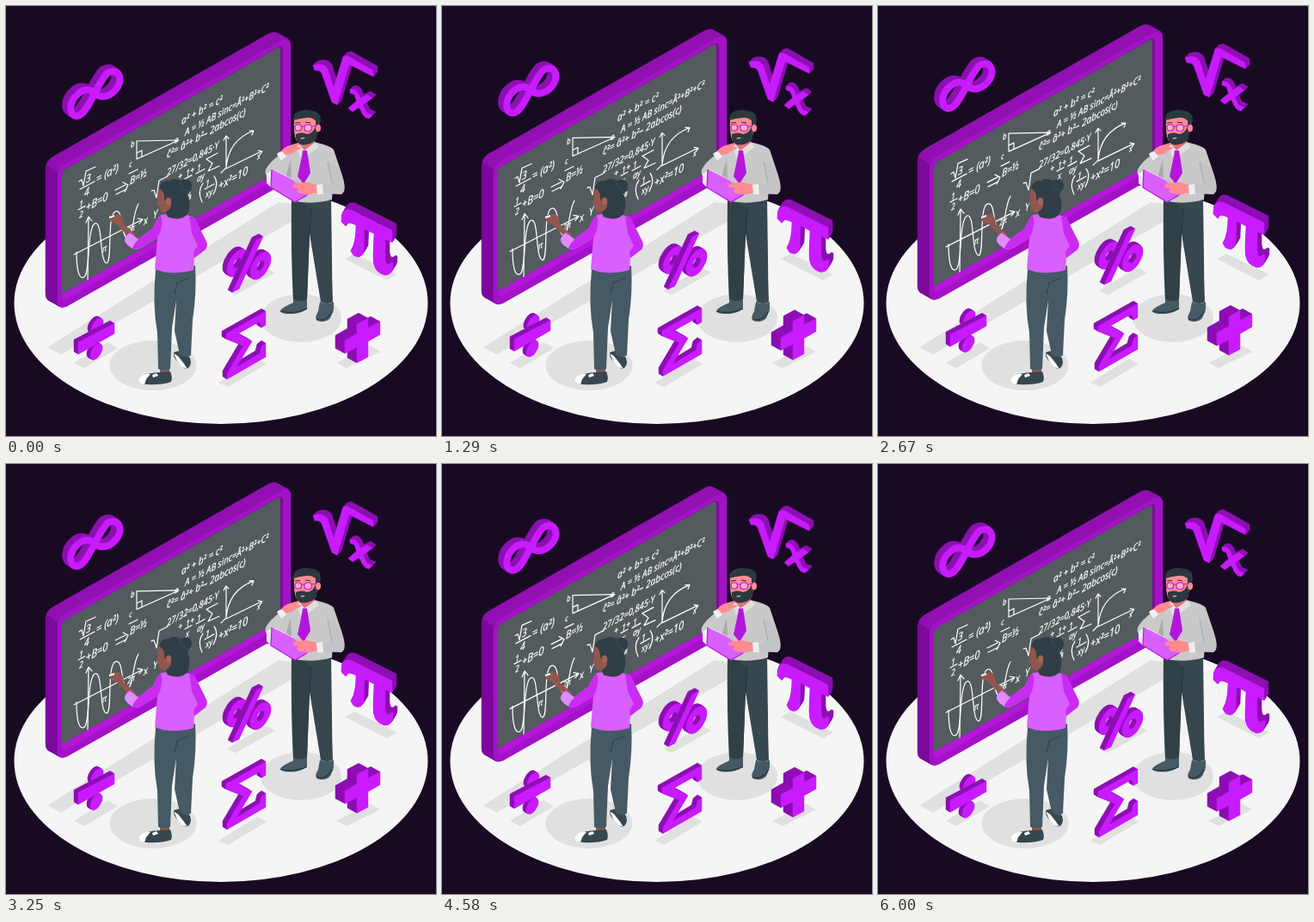
Recreate the animation shown at these times as an HTML page. Size 500x500 px, loop 6040 ms.

```html
<!DOCTYPE html>
<html lang="en">
<head>
<meta charset="utf-8">
<title>Maths class</title>
<style>
html, body { margin: 0; width: 100%; height: 100%; overflow: hidden; background: #190a24; }
svg { display: block; width: 100vw; height: 100vh; }
.shadow { fill: #e0e0e0; }
.chalk { fill: none; stroke: #fff; stroke-width: 1.2; stroke-linecap: round; stroke-linejoin: round; }
.chalk text { fill: #fff; stroke-width: .3; font-family: "Open Sans", "Noto Sans", sans-serif; font-style: italic; }
.dark { fill: #8d10b3; stroke: #8d10b3; }
.front { fill: #c91bff; stroke: #c91bff; }
.dark, .front { stroke-width: .4; stroke-linejoin: round; }
.band .dark, .band .front { fill: none; stroke-width: 8; }
.rim .dark { fill: #7e0c9e; stroke: #7e0c9e; }
.rim .front { fill: #a312c6; stroke: #a915cd; }
</style>
</head>
<body>
<svg viewBox="0 0 500 500">
  <rect width="500" height="500" fill="#190a24"/>
  <ellipse cx="250" cy="345.5" rx="240.5" ry="140.5" fill="#f5f5f5"/>
  <g class="shadow">
    <path d="M48 397L64 405L340 246V231L317 228Z"/>
    <ellipse cx="171" cy="418" rx="50.5" ry="29"/>
    <ellipse cx="343" cy="363" rx="47" ry="28"/>
    <path d="M79 415L91 421L130 398L118 391Z"/>
    <path d="M257 331L267 336L313 310L302 304Z"/>
    <path d="M247 438L258 443L303 416L292 410Z"/>
    <path d="M384 415L396 421L435 402L424 395Z"/>
    <path d="M394 294L405 288L455 312L443 319Z"/>
  </g>

  <g class="float" id="board"></g>
  <g class="float chalk" id="writing"></g>
  <g class="float" id="symbols"></g>

  <g id="student">
    <path d="M195 403Q202 399 206 404L214 409Q217 419 210 422Q206 422 201 415Q194 409 195 403Z" fill="#37474f"/>
    <path d="M195 404L199 413L205 420L211 422L207 416L200 407Z" fill="#fff"/>
    <path d="M203 398H212L213 408L207 407Z" fill="#91564d"/>
    <path d="M179 418H190V429L179 428Z" fill="#91564d"/>
    <path d="M155 432Q166 426 179 426L191 425Q194 432 192 437Q180 441 164 440Q154 440 155 432Z" fill="#37474f"/>
    <path d="M155 432Q162 427 168 428L163 434L161 440Q153 439 155 432ZM170 429L175 427L177 430L171 432Z" fill="#fff"/>
    <path d="M174 306Q170 348 176 380L177 422Q184 425 191 422L193 374L198 342L196 378L202 405Q209 411 215 406L217 365Q222 333 220 302Z" fill="#455a64"/>
    <path d="M196 335L199 322L213 316" fill="none" stroke="#2f3e45" stroke-width="1"/>
    <path d="M145 269Q135 262 129 254L121 250Q119 245 123 243L132 242Q137 246 137 254L151 266Z" fill="#91564d"/>
    <path d="M120 246L126 244" stroke="#fff" stroke-width="2"/>
    <path d="M180 243Q174 249 171 258L154 271L144 263Q137 268 138 274L147 282Q153 285 161 279L176 270L173 306Q192 314 218 307L219 293L232 283Q236 278 231 270L219 246Q204 239 180 243Z" fill="#d95fff"/>
    <path d="M180 243Q174 249 171 258L154 271L146 281Q153 285 161 279L176 270Q184 256 180 243ZM213 244L219 246L231 270Q236 278 232 283L219 293L218 286L223 279L216 264Z" fill="#c92bf2"/>
    <path d="M138 271Q141 263 147 266L154 272Q149 275 147 282Q138 277 138 271Z" fill="#e08cff"/>
    <path d="M180 209Q175 216 177 224L175 230L178 233Q178 241 185 240L188 246L201 243L196 213Z" fill="#91564d"/>
    <path d="M178 212Q179 203 190 203Q195 199 203 203Q213 199 216 207Q217 214 211 219Q216 230 211 242Q205 249 195 247Q186 246 186 239Q193 237 192 228Q184 230 184 222Q184 215 178 212Z" fill="#2f3e46"/>
    <ellipse cx="189" cy="227" rx="3.3" ry="4.5" fill="#a0655b"/>
    <path d="M202 204Q203 213 213 216" fill="none" stroke="#43545b" stroke-width=".8"/>
  </g>

  <g id="teacher">
    <path d="M332 222Q331 288 334 342Q343 346 350 341L353 265L366 344Q374 348 380 344Q379 318 379 294L378 222Z" fill="#37474f"/>
    <path d="M332 222L333 300L334 342Q343 346 350 341L353 265L355 237L346 229Z" fill="#314047"/>
    <path d="M355 235L353 266" stroke="#25333a" stroke-width="1"/>
    <path d="M334 341Q343 345 350 341V352Q343 358 330 358Q319 358 319 354Q322 350 334 345Z" fill="#455a64"/>
    <path d="M365 344Q374 348 381 344V353L377 363Q371 369 362 366Q358 363 363 355Z" fill="#455a64"/>
    <path d="M319 355Q333 359 350 352M361 364Q372 368 380 355" fill="none" stroke="#263238" stroke-width="1.2"/>
    <path d="M340 161L332 169L318 173Q306 182 302 190Q300 196 306 200L331 199L332 226Q354 232 379 225L380 211L393 214Q395 210 391 197L381 167Q376 162 362 159Z" fill="#c9c9c9"/>
    <path d="M374 181L380 206L365 210L362 218L390 219Q395 216 393 209L387 188Z" fill="#c4c4c4"/>
    <path d="M374 181L379 206" stroke="#a8a8a8" stroke-width="1"/>
    <path d="M331 179L325 199L332 201Z" fill="#aaa"/>
    <path d="M341 151H359V163L348 170L341 163Z" fill="#e56f7b"/>
    <path d="M341 160L347 168L360 158L364 164L350 174L346 169L342 176L338 164Z" fill="#e0e0e0"/>
    <path d="M345 168L350 168L351 174L354 194L346 207L339 198L344 175Z" fill="#b416dc"/>
    <path d="M335 132Q334 150 338 157Q347 162 359 154L364 143V130L352 125Z" fill="#ff8b91"/>
    <path d="M334 133Q333 123 346 121Q361 120 365 127Q367 133 364 139L360 139V133Q355 129 349 130Q340 131 334 133ZM360 139L362 145L361 155Q353 163 342 161Q336 157 337 149Q344 146 350 149Q358 148 360 139Z" fill="#2b393f"/>
    <path d="M342 154Q345 152 348 153Q345 156 342 154Z" fill="#f2a0a2"/>
    <ellipse cx="363" cy="142" rx="3" ry="4.2" fill="#ff8b91"/>
    <g fill="#ffb0c4" stroke="#bd19e8" stroke-width="1.2">
      <rect x="336" y="138" width="7.5" height="7" rx="3"/>
      <rect x="347" y="138" width="8.5" height="7.5" rx="3.2"/>
      <path d="M343.5 140H347M355.5 140L362 139" fill="none"/>
    </g>
    <path d="M336 136L342 135.500M348 135L354 136" stroke="#263238" stroke-width="1.1"/>
    <path d="M318 171Q323 164 330 162L340 159Q343 160 338 164L343 164Q343 167 337 168Q334 173 326 173L321 177Z" fill="#ff8b91"/>
    <path d="M315 172Q319 168 322 170L326 175L320 180Z" fill="#f0f0f0"/>
    <path d="M303 195L309 191L313 210L308 211L303 206Z" fill="#eee"/>
    <path d="M309 190L337 203L352 219L336 228L308 211Z" fill="#d95fff"/>
    <path d="M309 190L308 211L336 228L350 220" fill="none" stroke="#b81ae0" stroke-width="1.3"/>
    <path d="M311 190L336 203L343 212" fill="none" stroke="#f0d5fa" stroke-width="1"/>
    <path d="M362 208L350 205L337 206Q331 209 334 211L341 212Q335 215 342 218L353 219L363 217Z" fill="#ff8b91"/>
    <path d="M361 208L368 207L369 219L362 219Z" fill="#f0f0f0"/>
  </g>
</svg>
<script>
const LOOP = 6040, RISE = 9.2;
const get = id => document.getElementById(id);
const board = get("board"), writing = get("writing"), symbols = get("symbols");

// Repeats a shape along its depth, then lays the front face on top.
function solid(d, dx, dy, kind = "") {
  const steps = Math.ceil(2 * Math.hypot(dx, dy));
  let out = "";
  for (let i = 0; i <= steps; i++) {
    const k = 1 - i / steps, face = i === steps ? "front" : "dark";
    out += `<path class="${face}" fill-rule="evenodd" transform="translate(${dx * k} ${dy * k})" d="${d}"/>`;
  }
  return `<g class="${kind}">${out}</g>`;
}

// Circle lying in the rising isometric plane.
function disc(x, y, r) {
  const dx = .61 * r, dy = .35 * r, arc = `A${.707 * r} ${1.225 * r} 30 1 1 `;
  return `M${x - dx} ${y - dy}${arc}${x + dx} ${y + dy}${arc}${x - dx} ${y - dy}Z`;
}

const ring = (x, y) => disc(x, y, 13) + disc(x, y, 5);

const chalkText = (x, y, size, text) =>
  `<text transform="matrix(.87 -.48 0 1 ${x} ${y})" font-size="${size}">${text}</text>`;

function fraction(x, y, top, bottom, width = 8) {
  return chalkText(x + 1, y - 2, 10, top) + chalkText(x + 1, y + 10, 10, bottom) +
    `<path d="M${x} ${y}l${width} ${-width * .55}"/>`;
}

board.innerHTML =
  solid("M60 198Q60 188 69 183L318 41Q331 34 331 46V202L71 349Q60 354 60 342Z", -14, -8, "rim") +
  '<path d="M47 184Q49 179 55 175L304 33Q311 29 317 32L330 39Q325 37 318 41L69 183Q62 187 60 193Z" fill="#9210b2"/>' +
  '<path d="M65 197Q65 193 69 190L316 48Q322 45 322 51V197L70 340Q65 342 65 337Z" fill="#7a0c98"/>' +
  '<path d="M65 335L319 191L322 197L70 341Q65 343 65 337Z" fill="#b516da"/>' +
  '<path d="M65 197Q65 193 69 190L315 49Q319 47 319 51V191L65 335Z" fill="#535b5f"/>';

writing.innerHTML =
  chalkText(204, 138, 11.5, "a² + b² = c²") +
  chalkText(208, 151, 11, "A = ½ AB sinc=Â²+B²+C²") +
  chalkText(187, 177, 11.5, "ĉ²= â²+ b²– 2abcos(c)") +
  chalkText(187, 198, 11, "27/32=0,845·Y") +
  '<path d="M85 204l3 -2l2 7l3 -17l11 -5M86 213l17 -9"/>' +
  chalkText(93, 206, 12, "3") + chalkText(91, 222, 12, "4") +
  chalkText(105, 206, 13, "= (a²)") +
  fraction(84, 237, "1", "2") +
  chalkText(93, 239, 13, "+B=0") +
  '<path d="M127 214l12 -6M128 219l12 -6M136 205l6 3l-4 8M143 195l10 -5"/>' +
  chalkText(144, 208, 12, "B=½") +
  '<path d="M152 157L201 156L152 178ZM152 171l6 -3v7"/>' +
  chalkText(145, 165, 9, "b") + chalkText(143, 188, 9, "c") + chalkText(196, 160, 9, "a") +
  '<path d="M256 152V189L297 169M253 156l3 -5l3 3M293 168l5 1l-3 4M256 188C258 163 272 151 288 145M283 145l5 0l-2 5M250 194l6 -6"/>' +
  chalkText(292, 179, 9, "x") +
  chalkText(200, 203, 11, "+") + fraction(208, 201, "1", "x") +
  chalkText(214, 196, 11, "+") + fraction(221, 195, "1", "ay", 10) +
  '<path d="M246 171l-13 7l7 5l-5 9l13 -6"/>' +
  chalkText(208, 228, 12, "⅞") +
  '<path d="M229 206q-7 10 -1 22M242 198q6 8 -1 21"/>' +
  fraction(231, 213, "1", "xy", 11) +
  chalkText(247, 214, 13, "+x²=10") +
  '<path d="M169 215l3 -1l3 9l3 -20l10 -5"/>' +
  chalkText(160, 255, 12, "x") + chalkText(171, 248, 12, "Y") +
  '<path d="M95 318L96 246M93 252l3 -7l4 5M79 289L159 248M153 247l6 1l-4 5"/>' +
  '<path d="M82 286C82 307 85 319 91 315C98 310 94 260 103 253C113 248 108 297 117 299C124 298 117 244 127 239C137 235 133 267 141 270C148 270 147 241 154 230"/>' +
  chalkText(112, 287, 10, "π") + chalkText(141, 265, 9, "2π");

symbols.innerHTML =
  // infinity
  solid("M104 102C97 96 91 96 84 102C73 111 72 128 83 128C95 127 106 89 118 78C130 71 136 83 130 94C122 106 111 108 104 102Z", -6, -4, "band") +
  // divide
  solid(disc(106, 372.5, 7.7), -4, -2.3) +
  solid(disc(105, 402, 7.7), -4, -2.3) +
  solid("M84 391L126 369V381L84 405Z", -5, -3) +
  // percent
  solid(ring(269, 299), -5, -3) +
  solid(ring(296, 302), -5, -3) +
  solid("M291 272L299 268L271 329L263 333Z", -5, -3) +
  // sum
  solid("M256 381L302 355V371L297 374L295 367L270 381L286 390L268 420L295 404L297 396L302 392V408L257 434V427L276 395L256 387Z", -5, -3) +
  // plus
  solid("M408 370L421 363V374L435 367V382L421 390V408L408 415V397L394 404V389L408 381Z", -11, -6) +
  // root
  solid("M357 69Q369 65 374 73L381 95L392 59L397 58L427 75V82L399 68L385 115L379 112L367 78Q364 74 359 75Z", 5, -5) +
  solid("M400 97Q406 95 410 102L412 107L420 103L426 107L415 115L419 124L426 127L422 131Q415 130 412 120L410 118L403 123L398 119L408 111L405 103L400 101Z", 4, -4) +
  // pi
  solid("M390 251Q389 234 401 237L449 261V275L441 271V294Q442 304 448 298L450 299Q451 313 440 313Q426 309 427 291L428 265L417 259L416 286Q412 295 404 290L401 285Q407 276 407 255Q397 249 395 256Z", 5, -8);

const floaters = document.querySelectorAll(".float");

function draw(now) {
  const phase = (now % LOOP) / LOOP;
  const lift = -RISE * (1 - Math.cos(phase * 2 * Math.PI)) / 2;
  floaters.forEach(g => g.setAttribute("transform", `translate(0 ${lift.toFixed(3)})`));
}

const start = performance.now();
function tick() {
  draw(performance.now() - start);
  requestAnimationFrame(tick);
}
draw(0);
requestAnimationFrame(tick);
</script>
</body>
</html>
```
